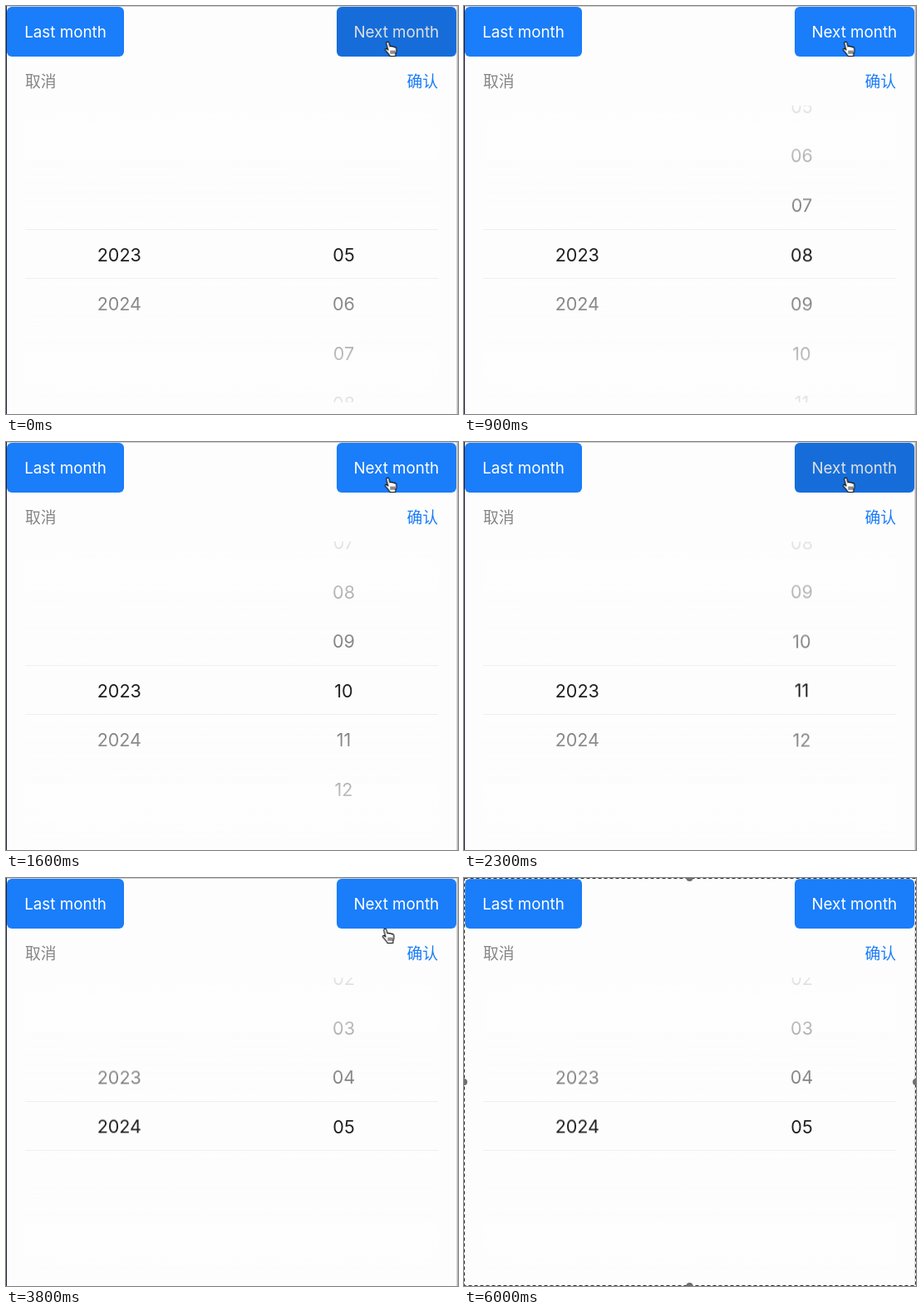
An HTML page that plays this animation: 544x492 px, repeating every 6900 ms.

```html
<!DOCTYPE html>
<html lang="zh-CN">
<head>
<meta charset="utf-8">
<title>Month picker</title>
<style>
  html, body { margin: 0; width: 100%; height: 100%; overflow: hidden; background: #fdfdfd; }
  svg { display: block; }
  text { font-family: Inter, "Noto Sans CJK SC", "Noto Sans CJK", sans-serif; }
  .label { font-size: 18.8px; fill: #fff; text-anchor: middle; }
  .action { font: 18.8px "Noto Sans CJK SC", "Noto Sans CJK", sans-serif; }
  .item { font-size: 21.5px; fill: #1f1f1f; text-anchor: middle; }

  .press, .months, .years, .old, .new, .hand, .select {
    animation: 6.9s step-end infinite;
  }
  .press { animation-name: press; }
  .months { animation-name: months; }
  .years { animation-name: years; }
  .old { animation-name: old; }
  .new { animation-name: new; }
  .hand { animation-name: hand; }
  .select { animation-name: select; }

  @keyframes press {
    0%, 5.79%, 10.14%, 15.94%, 21.73%, 27.53%, 33.33%, 39.13% { opacity: .12; }
    1.44%, 7.24%, 13.04%, 17.39%, 23.18%, 28.98%, 34.78%, 42.02%, 100% { opacity: 0; }
  }
  /* one row is 59.6px */
  @keyframes months {
    0% { transform: translateY(0); }
    1.44% { transform: translateY(-59.6px); }
    7.24% { transform: translateY(-119.2px); }
    13.04% { transform: translateY(-178.8px); }
    17.39% { transform: translateY(-238.4px); }
    23.18% { transform: translateY(-298px); }
    28.98% { transform: translateY(-357.6px); }
    34.78%, 100% { transform: translateY(-417.2px); }
  }
  @keyframes years {
    0% { transform: translateY(0); }
    42.02%, 100% { transform: translateY(-59.6px); }
  }
  @keyframes old {
    0% { opacity: 1; }
    42.02%, 100% { opacity: 0; }
  }
  @keyframes new {
    0% { opacity: 0; }
    42.02%, 100% { opacity: 1; }
  }
  @keyframes hand {
    0% { transform: translate(455.5px, 42px); opacity: 1; }
    53.62% { transform: translate(454px, 51px); opacity: 1; }
    55.07% { transform: translate(452.5px, 60px); opacity: 1; }
    69.56% { transform: translate(449px, 51px); opacity: 1; }
    78.26%, 100% { transform: translate(449px, 51px); opacity: 0; }
  }
  @keyframes select {
    0% { opacity: 0; }
    69.56%, 100% { opacity: 1; }
  }
</style>
</head>
<body>
<svg width="544" height="492" viewBox="0 0 544 492">
  <defs>
    <clipPath id="view"><rect y="120" width="544" height="358"/></clipPath>
    <linearGradient id="fade" x1="0" y1="0" x2="0" y2="1">
      <stop offset="0" stop-color="#fdfdfd" stop-opacity=".9"/>
      <stop offset="1" stop-color="#fdfdfd" stop-opacity=".37"/>
    </linearGradient>
  </defs>

  <rect width="544" height="492" fill="#fdfdfd"/>
  <rect width="544" height="1" fill="#cdcdcd"/>
  <rect width="1" height="492" fill="#201b38"/>
  <rect x="542.5" width="1.5" height="492" fill="#b4b4b6"/>

  <g fill="#1a7df9">
    <rect x="1" y="1" width="141" height="60" rx="6"/>
    <rect x="398" y="1" width="144" height="60" rx="6"/>
  </g>
  <text class="label" x="71.5" y="38">Last month</text>
  <text class="label" x="469.8" y="38">Next month</text>
  <rect class="press" x="398" y="1" width="144" height="60" rx="6" fill="#000"/>

  <text class="action" x="23" y="98" fill="#858585">取消</text>
  <text class="action" x="520" y="98" fill="#1a7df9" text-anchor="end">确认</text>

  <g clip-path="url(#view)">
    <g class="years">
      <text class="item" x="136.3" y="307.8">2023</text>
      <text class="item" x="136.3" y="367.4">2024</text>
    </g>
    <g class="old"><g class="months">
      <text class="item" x="406.5" y="307.8">05</text>
      <text class="item" x="406.5" y="367.4">06</text>
      <text class="item" x="406.5" y="427">07</text>
      <text class="item" x="406.5" y="486.6">08</text>
      <text class="item" x="406.5" y="546.2">09</text>
      <text class="item" x="406.5" y="605.8">10</text>
      <text class="item" x="406.5" y="665.4">11</text>
      <text class="item" x="406.5" y="725">12</text>
    </g></g>
    <g class="new">
      <text class="item" x="406.5" y="69.4">01</text>
      <text class="item" x="406.5" y="129">02</text>
      <text class="item" x="406.5" y="188.6">03</text>
      <text class="item" x="406.5" y="248.2">04</text>
      <text class="item" x="406.5" y="307.8">05</text>
    </g>
    <rect x="23" y="120" width="497" height="149" fill="url(#fade)"/>
    <rect x="23" y="120" width="497" height="149" fill="url(#fade)" transform="matrix(1 0 0 -1 0 598)"/>
  </g>
  <path d="M23 269.5H520M23 328.5H520" stroke="#eee"/>

  <g class="hand" stroke="#111" stroke-width="1.2" stroke-linejoin="round" stroke-linecap="round">
    <path fill="#fff" d="M3 1.5C4 .7 5 1.2 5.3 2.4L6.6 7C7 5.9 8.8 6 9.2 7.2C9.8 6.3 11.4 6.6 11.7 7.8C12.5 7.1 13.9 7.6 14.1 9C14.6 11 14.6 13 13.6 15L13.2 18.5H6.6C6 16.6 3.4 14 1.2 11.4C.4 10.2 1.6 9 2.8 9.6L4.3 11L2.4 3.6C2.2 2.7 2.4 1.9 3 1.5Z"/>
    <path fill="none" stroke-width="1" d="M7.8 12v3.4M9.9 12v3.4M12 12v3.4"/>
  </g>

  <g class="select">
    <rect x=".5" y=".5" width="543" height="491" fill="none" stroke="#f4f4f4" stroke-width="1.4"/>
    <rect x=".5" y=".5" width="543" height="491" fill="none" stroke="#333" stroke-dasharray="4 3"/>
    <g fill="#6e6e6e">
      <circle cx="271.5" cy="0" r="4"/>
      <circle cx="271.5" cy="492" r="4"/>
      <circle cx="0" cy="246" r="4"/>
      <circle cx="544" cy="246" r="4"/>
    </g>
  </g>
</svg>
</body>
</html>
```
